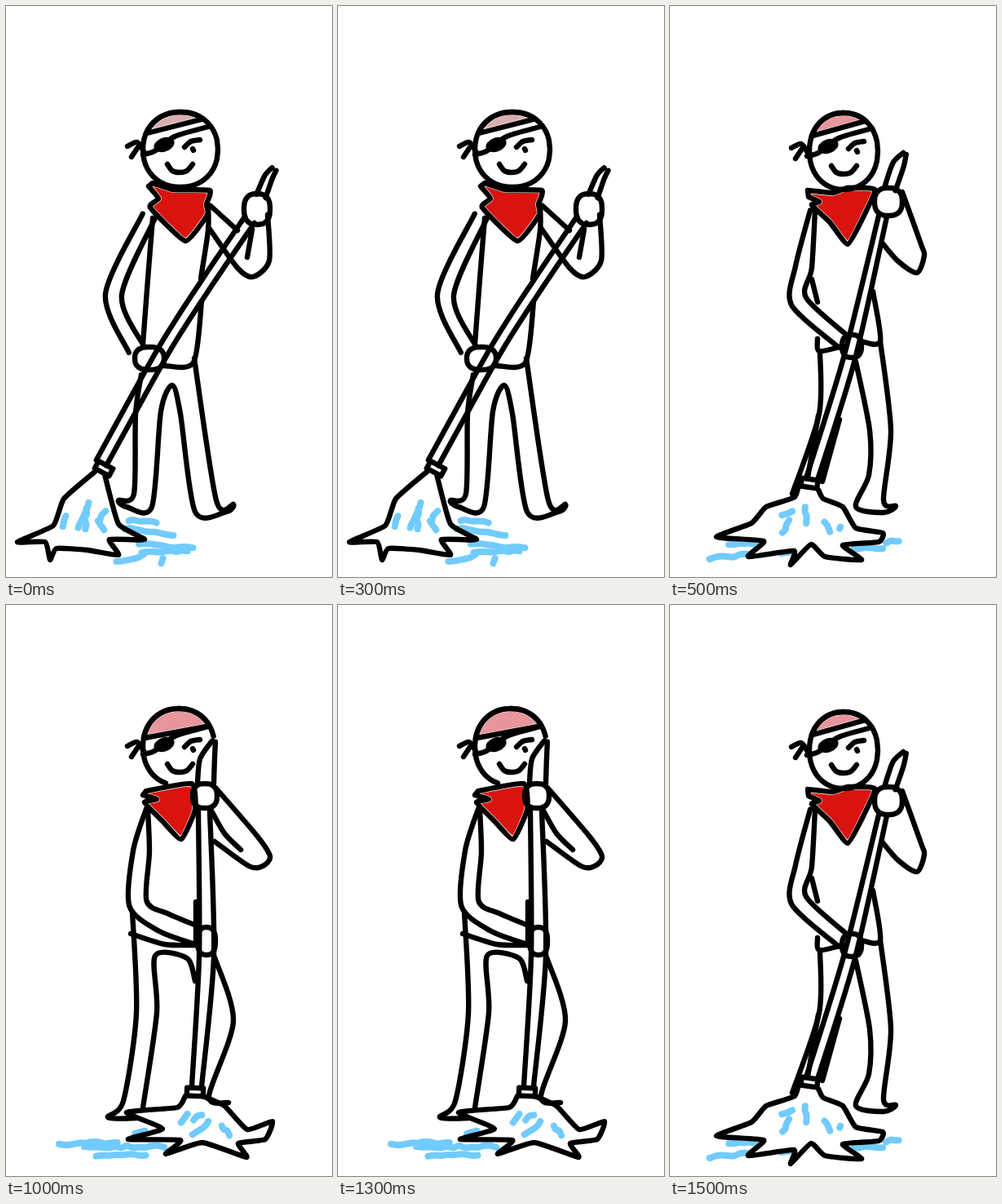
These frames come from a looping animation (400 px wide and 700 px high, 2000 ms). An HTML page:

```html
<!DOCTYPE html>
<html lang="en">
<head>
<meta charset="utf-8">
<title>Mopping pirate</title>
<style>
html, body { margin: 0; width: 100%; height: 100%; overflow: hidden; background: #fff; }
svg { display: block; width: 400px; height: 700px; }
path, rect { fill: none; stroke: #000; stroke-width: 6.4; stroke-linecap: round; stroke-linejoin: round; }
.water path { stroke: #72cbfd; stroke-width: 8; }
.rim { stroke: #fff; stroke-width: 7.6; }
</style>
</head>
<body>
<svg id="stage" viewBox="0 0 400 700"></svg>
<script>
// Shared face; each pose only shifts it.
const face = [
  '168,184 182,180 207,162 248,150',
  '149,174 161,169 169,180', '164,172 154,187',
  '219,175 227,168 238,166', '229,177 230,179',
  '198,196 204,204 213,206 222,204 229,196'
];

// ovals: cx,cy,rx,ry. tubes: a centre line of x,y,half width. lines and cloth: key points.
const left = {
  head: [214, 176, 46, 46], arc: [0, 360], hat: [204, 306], pink: '#d9aeae', lift: -2,
  scarf: '180,217 205,225 250,226 246,243 247,256 220,288 177,247 187,236 175,221',
  hands: ['308,249,16,19', '176,432,18,14'],
  tubes: [
    '299,262,7 248,337,7 194,421,7 117,560,7', '313,233,6 322,210,5 329,200,3',
    '175,258,8 132,354,10 160,421,10'
  ],
  lines: [
    '180,260 174,335 168,414', '248,244 248,275 239,334', '240,362 230,437 194,441',
    '251,245 284,275', '249,272 284,321 303,332 323,312 321,256', '302,274 296,308',
    '166,452 159,500 157,598 138,606 148,614 179,614 190,497 204,465 214,500 232,620 270,620 279,611 258,606 231,432'
  ],
  collar: [120, 567, 28],
  hem: '109,571 71,604 58,637 14,657 48,657 54,679 62,665 100,667 138,673 127,654 170,654 138,635 121,574',
  water: [
    '75,624 69,638', '102,608 88,641', '98,616 97,641', '121,618 114,632', '114,632 119,642',
    '150,630 185,634', '145,640 205,649', '163,659 228,665', '135,682 168,673', '168,671 224,667', '190,682 194,676'
  ]
};

const middle = {
  head: [213, 178, 42, 47], arc: [0, 360], hat: [202, 309], pink: '#e8959b', lift: 0,
  scarf: '169,226 200,229 218,223 251,225 237,259 218,292 196,265 174,244 183,240 170,234',
  hands: ['268,240,17,17', '223,417,12,14'],
  tubes: [
    '261,258,5 220,432,7 174,580,7', '270,224,7 280,195,7 288,181,2',
    '175,251,3 164,320,10 158,362,10 212,411,9'
  ],
  lines: [
    '174,335 181,363', '249,350 258,411 234,411', '181,408 183,423 208,418',
    '285,228 308,292 312,306 303,327 280,313 260,290',
    '184,424 183,500 150,598', '182,502 169,578', '208,507 187,583',
    '228,436 245,520 244,575 228,614 262,621 277,613 262,606 271,520 258,411'
  ],
  collar: [171, 585, 8],
  hem: '159,582 153,602 118,614 100,634 57,651 115,656 96,675 152,668 148,685 173,660 190,675 235,679 212,661 256,657 261,646 228,640 212,614 188,604 182,593',
  water: [
    '151,618 138,625', '147,630 138,647', '167,613 166,633', '188,631 197,644', '208,639 209,641',
    '71,660 104,659', '48,677 100,672', '136,671 150,670', '226,665 260,664', '264,658 280,655'
  ]
};

const right = {
  head: [212, 174, 44, 47], arc: [110, 345], hat: [192, 328], pink: '#e8959b', lift: -1,
  scarf: '172,228 228,219 232,251 215,287 192,265 170,242 185,238 168,233',
  hands: ['244,234,15,15', '246,412,11,17'],
  tubes: [
    '243,252,7 246,430,9 234,590,6', '245,218,10 247,190,9 255,167,2',
    '173,250,1 166,302,10 162,366,11 193,389,12 234,405,11'
  ],
  lines: [
    '153,403 195,416 232,417', '233,364 233,416',
    '258,225 308,283 324,308 315,320 298,320 256,290', '252,252 268,280 288,300',
    '155,376 160,500 144,608 125,628 160,629', '168,616 185,500 183,430 222,433 232,461',
    '256,432 279,510 249,602 273,610'
  ],
  collar: [232, 597, 2],
  hem: '220,602 210,616 148,622 192,642 150,655 214,656 196,673 241,659 295,677 285,660 318,655 327,633 296,643 268,614 241,602',
  water: [
    '224,625 216,636', '240,624 231,631', '249,633 230,650', '264,637 275,650',
    '66,662 137,658', '157,647 171,645', '96,664 193,664', '110,675 172,674'
  ]
};

const LOOP = 2000;
const SVG = 'http://www.w3.org/2000/svg';
const points = text => text.split(' ').map(s => s.split(',').map(Number));

let seed = 7;
const jitter = size => ((seed = seed * 16807 % 2147483647) / 2147483647 - 0.5) * size;

function add(parent, tag, attrs = {}) {
  const el = document.createElementNS(SVG, tag);
  for (const k in attrs) el.setAttribute(k, attrs[k]);
  return parent.appendChild(el);
}

// Cardinal spline; a low bend keeps the corners sharp.
function curve(pts, bend = 0.14) {
  const at = i => pts[Math.max(0, Math.min(pts.length - 1, i))];
  let d = 'M' + pts[0];
  for (let i = 0; i < pts.length - 1; i++) {
    const [a, b, c, e] = [at(i - 1), at(i), at(i + 1), at(i + 2)];
    const c1 = b.map((v, k) => v + (c[k] - a[k]) * bend);
    const c2 = c.map((v, k) => v - (e[k] - b[k]) * bend);
    d += `C${c1} ${c2} ${c}`;
  }
  return d;
}

// Part of an oval; a lower power makes it squarer.
function oval([cx, cy, rx, ry], [from, to], power) {
  const soft = v => Math.sign(v) * Math.abs(v) ** power;
  return Array.from({ length: 25 }, (_, i) => {
    const a = (from + (to - from) * i / 24) * Math.PI / 180;
    return [cx + rx * soft(Math.cos(a)), cy + ry * soft(Math.sin(a))];
  });
}

// One edge of a tube: the centre line moved sideways by its half width.
function edge(line, side) {
  return line.map(([x, y, w], i) => {
    const a = line[Math.max(0, i - 1)], b = line[Math.min(line.length - 1, i + 1)];
    const dx = b[0] - a[0], dy = b[1] - a[1], k = side * w / Math.hypot(dx, dy);
    return [x - dy * k, y + dx * k];
  });
}

function scribble([[x1, y1], [x2, y2]]) {
  const n = Math.ceil(Math.hypot(x2 - x1, y2 - y1) / 8);
  return Array.from({ length: n + 1 }, (_, i) =>
    [x1 + (x2 - x1) * i / n + jitter(3), y1 + (y2 - y1) * i / n + jitter(3)]);
}

function draw(pose) {
  const g = add(document.getElementById('stage'), 'g');
  const ink = (pts, bend) => add(g, 'path', { d: curve(pts, bend) });
  const cloth = (pts, fill) => {
    const d = curve(pts, 0.08) + 'Z';
    add(g, 'path', { d, class: 'rim', style: `fill:${fill}` });
    add(g, 'path', { d });
  };

  const water = add(g, 'g', { class: 'water' });
  for (const s of pose.water) add(water, 'path', { d: curve(scribble(points(s))) });

  cloth(oval(pose.head, pose.hat, 0.94), pose.pink);
  cloth(points(pose.scarf), '#d9140f');
  ink(oval(pose.head, pose.arc, 0.94));
  for (const s of face) ink(points(s).map(([x, y]) => [x, y + pose.lift]));
  add(g, 'ellipse', { rx: 13, ry: 8.5, transform: `translate(194 ${172 + pose.lift}) rotate(-20)` });

  for (const s of pose.hands) ink(oval(points(s)[0], [0, 360], 0.8));
  for (const s of pose.tubes) for (const side of [-1, 1]) ink(edge(points(s), side));
  for (const s of pose.lines) ink(points(s));

  const [x, y, turn] = pose.collar;
  add(g, 'rect', { x: -10, y: -5, width: 20, height: 10, transform: `translate(${x} ${y}) rotate(${turn})` });
  ink(points(pose.hem), 0.08);
  return g;
}

// Four equal steps: left, middle, right, middle.
const steps = [[left, [1, 0, 0, 0]], [middle, [0, 1, 0, 1]], [right, [0, 0, 1, 0]]];
for (const [pose, shown] of steps) {
  const frames = [...shown, shown[0]].map((opacity, i) => ({ opacity, offset: i / 4, easing: 'step-end' }));
  const anim = draw(pose).animate(frames, { duration: LOOP, iterations: Infinity });
  anim.startTime = document.timeline.currentTime;
}
</script>
</body>
</html>
```
